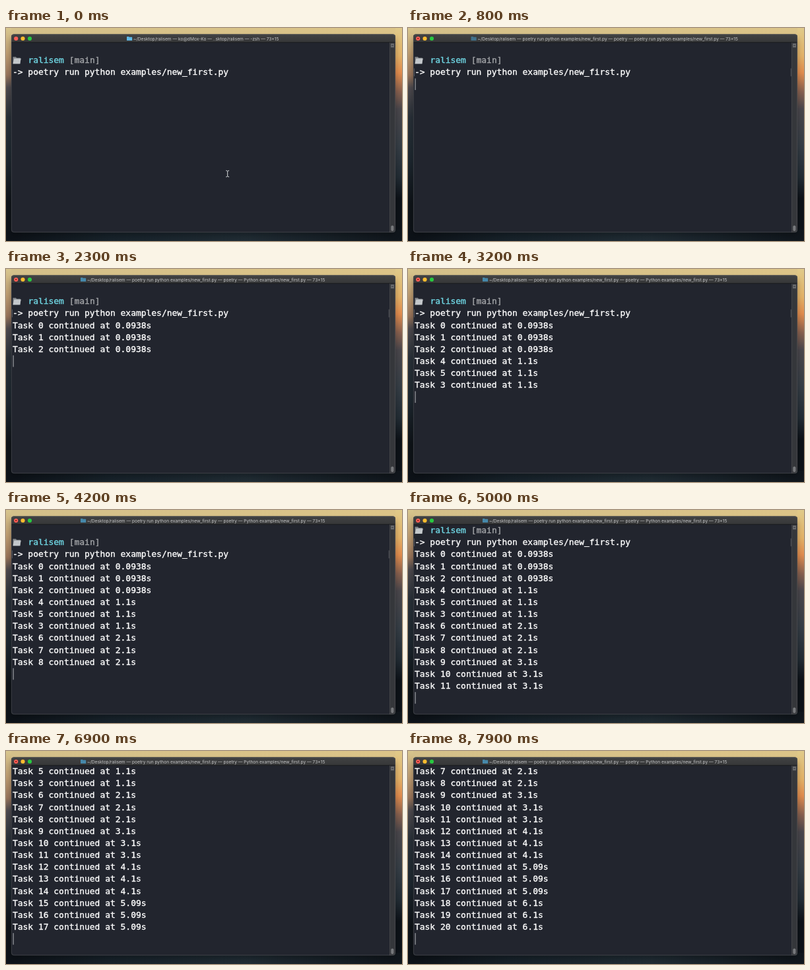
Write an HTML page that moves like this. It is 600 px wide and 323 px high and loops after 8000 ms.

```html
<!DOCTYPE html>
<html lang="en">
<head>
<meta charset="utf-8">
<title>Terminal run</title>
<style>
  html, body { margin: 0; width: 100%; height: 100%; overflow: hidden; background: #0d1218; }
  svg { display: block; width: 600px; height: 323px; }
  .mono { font: 12.95px "DejaVu Sans Mono", "Liberation Mono", monospace; }
  .mono text { stroke-width: .35px; }
  .title { font: 6.63px Inter, Roboto, sans-serif; fill: #c6c7c8; }
</style>
</head>
<body>
<svg viewBox="0 0 600 323" xmlns="http://www.w3.org/2000/svg">
  <defs>
    <linearGradient id="left" x2="0" y2="1">
      <stop offset="0" stop-color="#d8c68e"/>
      <stop offset=".12" stop-color="#bd9c70"/>
      <stop offset=".22" stop-color="#98745a"/>
      <stop offset=".28" stop-color="#4e4a4e"/>
      <stop offset=".42" stop-color="#283038"/>
      <stop offset=".62" stop-color="#1d272f"/>
      <stop offset=".82" stop-color="#0e1318"/>
      <stop offset="1" stop-color="#0d1218"/>
    </linearGradient>
    <linearGradient id="right" x2="0" y2="1">
      <stop offset="0" stop-color="#e0ca8a"/>
      <stop offset=".13" stop-color="#e3b268"/>
      <stop offset=".21" stop-color="#e08c4e"/>
      <stop offset=".3" stop-color="#86604f"/>
      <stop offset=".38" stop-color="#4a474c"/>
      <stop offset=".55" stop-color="#363e46"/>
      <stop offset=".7" stop-color="#222c34"/>
      <stop offset=".8" stop-color="#0d1218"/>
      <stop offset="1" stop-color="#0d1218"/>
    </linearGradient>
    <linearGradient id="top">
      <stop offset="0" stop-color="#d4c08a"/>
      <stop offset="1" stop-color="#dcc488"/>
    </linearGradient>
    <linearGradient id="bottom">
      <stop offset="0" stop-color="#0d1218"/>
      <stop offset=".25" stop-color="#17222a"/>
      <stop offset=".6" stop-color="#202c34"/>
      <stop offset="1" stop-color="#10161c"/>
    </linearGradient>
    <linearGradient id="bar" x2="0" y2="1">
      <stop offset="0" stop-color="#414243"/>
      <stop offset="1" stop-color="#363738"/>
    </linearGradient>
    <filter id="blur" x="-10%" y="-10%" width="120%" height="120%">
      <feGaussianBlur stdDeviation="4"/>
    </filter>
    <clipPath id="frame"><rect x="8" y="9.5" width="582" height="300.5" rx="4"/></clipPath>
    <clipPath id="pane"><rect x="8" y="22" width="573" height="288"/></clipPath>
  </defs>

  <rect width="300" height="323" fill="url(#left)"/>
  <rect x="300" width="300" height="323" fill="url(#right)"/>
  <rect x="8" width="582" height="12" fill="url(#top)"/>
  <rect x="8" y="306" width="592" height="17" fill="url(#bottom)"/>
  <rect x="8" y="15" width="582" height="299" rx="5" fill="#000" opacity=".3" filter="url(#blur)"/>

  <g clip-path="url(#frame)">
    <rect x="8" y="9" width="582" height="302" fill="#22252e"/>
    <rect x="8" y="9" width="582" height="13" fill="url(#bar)"/>
    <rect x="8" y="21.5" width="582" height=".8" fill="#111214"/>
    <rect x="581" y="22.3" width="9" height="288" fill="#35373b"/>
    <rect x="581" y="22.3" width=".7" height="288" fill="#484a4e"/>
    <rect x="583" y="23.5" width="5" height="6" rx=".6" fill="#696b6e"/>
    <path d="M584 26.5h3" stroke="#35373b" stroke-width=".8"/>
    <rect x="583.3" y="299.5" width="4.2" height="8.6" rx="2" fill="#77797c"/>
    <circle cx="15.2" cy="16" r="3.1" fill="#ff5f57"/>
    <circle id="busy" cx="15.2" cy="16" r="1.1" fill="#7e1610"/>
    <circle cx="25.5" cy="16" r="3.1" fill="#febc2e"/>
    <circle cx="36" cy="16" r="3.1" fill="#28c840"/>

    <path id="proxy" d="M0 13.6q0-.7.7-.7h2.2l.8.8h3.8q.7 0 .7.7v4q0 .7-.7.7h-6.8q-.7 0-.7-.7z"/>
    <text id="title" class="title" y="18.5"></text>

    <g clip-path="url(#pane)">
      <g id="lines" class="mono"></g>
      <rect id="caret" x="10.6" width="1" height="17.6" fill="#b4b6ba"/>
    </g>
  </g>
  <rect x="8.3" y="9.8" width="581.4" height="299.9" rx="4" fill="none" stroke="#66686b" stroke-width=".6" opacity=".7"/>

  <path id="mouse" d="M333.7 216.2q1.8 0 2 1.2q.2-1.2 2-1.2M335.7 217.4v7.2M333.7 225.8q1.8 0 2-1.2q.2 1.2 2 1.2" fill="none" stroke="#d8dadc" stroke-linecap="round"/>
</svg>

<script>
const LOOP = 8000, RUN = 500, FIRST = 1600, STEP = 1000;
const ROW = 18.15, TOP = 22, BASE = 13.1, ROWS = 15, LEFT = 10, COL = 7.796;
const NS = 'http://www.w3.org/2000/svg';
const $ = id => document.getElementById(id);

const script = 'examples/new_first.py';
const command = 'poetry run python ' + script;
const titles = [
  { at: 0, x: 193, icon: '#5fb9e6', text: '~/Desktop/ralisem — ko@dMox-Ko — ..sktop/ralisem — -zsh — 73×15' },
  { at: RUN, x: 105.5, icon: '#41718c', text: `~/Desktop/ralisem — ${command} — poetry — ${command} — 73×15` },
  { at: FIRST, x: 123, icon: '#4688aa', text: `~/Desktop/ralisem — ${command} — poetry — Python ${script} — 73×15` }
];
const seconds = ['0.0938', '1.1', '2.1', '3.1', '4.1', '5.09', '6.1'];
const order = Array.from({ length: 21 }, (_, i) => i);
order.splice(3, 3, 4, 5, 3);

function add(tag, attrs, text = '') {
  const el = document.createElementNS(NS, tag);
  for (const key in attrs) el.setAttribute(key, attrs[key]);
  el.textContent = text;
  $('lines').append(el);
  return el;
}

function write(row, col, text, color = '#fff') {
  return add('text', { x: LEFT + col * COL, y: TOP + row * ROW + BASE, fill: color, stroke: color }, text);
}

// Prompt block: folder, project and branch, then the command
const folderY = TOP + ROW + 3.6;
add('path', { d: `M10.5 ${folderY}h4.5l1.2 1.5h5.6v9h-11.3z`, fill: '#85898d' });
add('path', { d: `M12.4 ${folderY + 2.6}h10.4l-1.8 7.9h-10.5z`, fill: '#c4c8cb' });
write(1, 3, 'ralisem', '#71d9e6');
write(1, 11, '[main]', '#a6a8ab');
write(2, 0, '-> ' + command);
const marks = [9.2, 579.8].map(x =>
  add('rect', { x, y: TOP + 2 * ROW + 3, width: .8, height: 12, fill: '#64666b' }));

const tasks = order.map((id, i) => write(3 + i, 0, `Task ${id} continued at ${seconds[Math.floor(id / 3)]}s`));

const show = (el, on) => el.setAttribute('visibility', on ? 'inherit' : 'hidden');

function draw(t) {
  const running = t >= RUN;
  const batches = t < FIRST ? 0 : Math.floor((t - FIRST) / STEP) + 1;
  const count = Math.min(tasks.length, batches * 3);
  const scroll = Math.max(0, 3 + count + 1 - ROWS);

  tasks.forEach((el, i) => show(el, i < count));
  marks.forEach(el => show(el, running));
  $('lines').setAttribute('transform', `translate(0 ${-scroll * ROW})`);
  $('caret').setAttribute('y', TOP + (3 + count - scroll) * ROW);
  show($('caret'), running);
  show($('busy'), running);
  show($('mouse'), !running);

  const title = titles.filter(item => t >= item.at).pop();
  $('title').textContent = title.text;
  $('title').setAttribute('x', title.x);
  $('proxy').setAttribute('fill', title.icon);
  $('proxy').setAttribute('transform', `translate(${title.x - 10} 0)`);
}

function tick() {
  draw(performance.now() % LOOP);
  requestAnimationFrame(tick);
}
tick();
</script>
</body>
</html>
```
